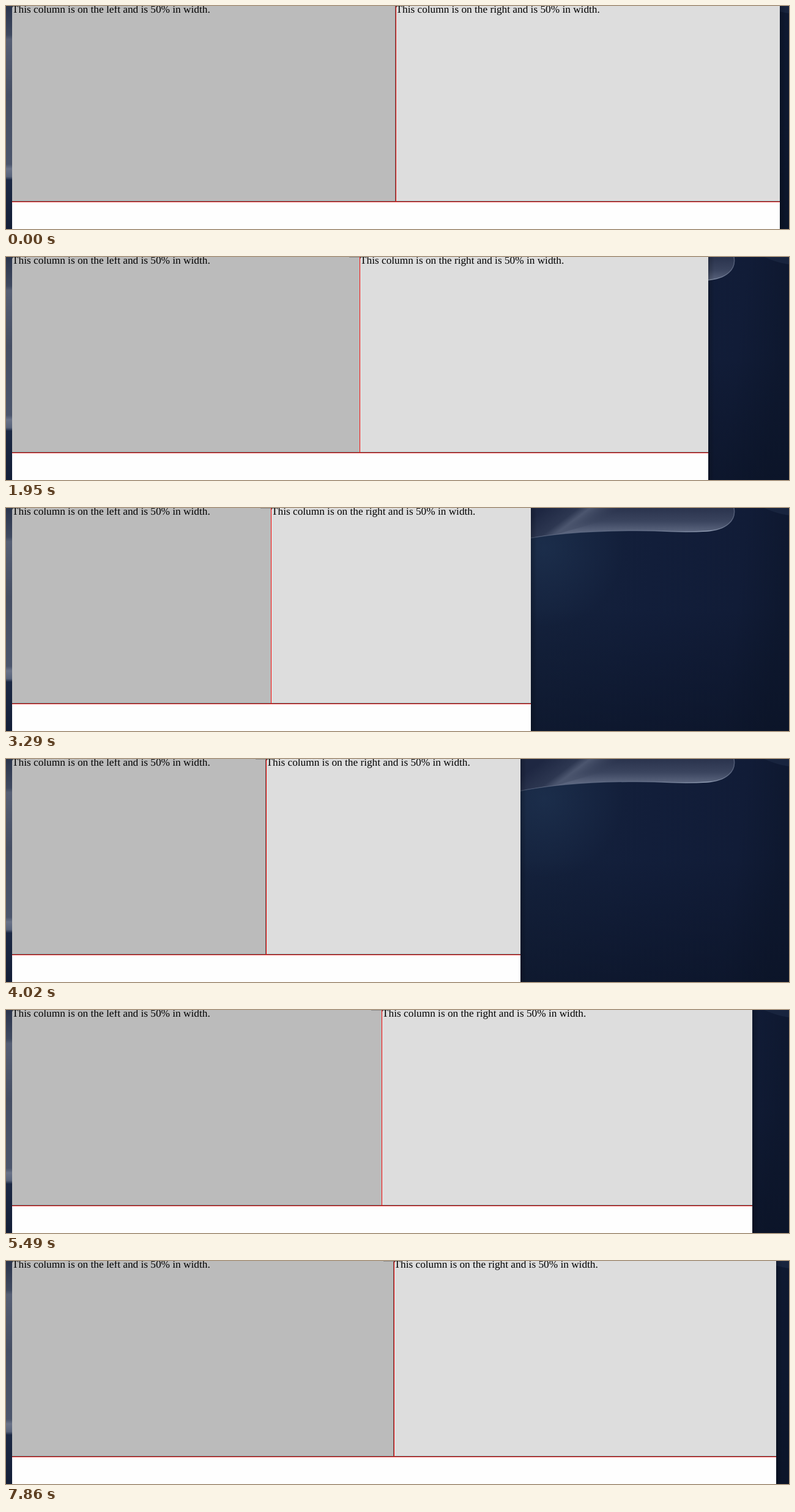
An HTML page that plays this animation: 1280x366 px, repeating every 8.26 s.

```html
<!DOCTYPE html>
<html lang="en">
<head>
<meta charset="utf-8">
<title>Two columns in a resized window</title>
<style>
  html, body { margin: 0; width: 100%; height: 100%; overflow: hidden; background: #0e1930; }
  svg { display: block; width: 1280px; height: 366px; }
  text { font: 17.27px "Liberation Serif", "Times New Roman", serif; text-rendering: geometricPrecision; }
  .line { fill: #f5100f; }
  .seam { fill: #5a5c5c; }
</style>
</head>
<body>
<svg viewBox="0 0 1280 366">
  <defs>
    <linearGradient id="night" x1="800" y1="0" x2="1280" y2="60" gradientUnits="userSpaceOnUse">
      <stop offset="0" stop-color="#15233d"/>
      <stop offset=".55" stop-color="#121e3a"/>
      <stop offset=".85" stop-color="#111c37"/>
      <stop offset="1" stop-color="#0e182f"/>
    </linearGradient>
    <linearGradient id="dusk" x2="0" y2="1">
      <stop offset=".45" stop-color="#0a1224" stop-opacity="0"/>
      <stop offset="1" stop-color="#0a1224" stop-opacity=".55"/>
    </linearGradient>
    <radialGradient id="glow" cx="880" cy="65" r="130" gradientUnits="userSpaceOnUse">
      <stop offset="0" stop-color="#263f60" stop-opacity=".4"/>
      <stop offset="1" stop-color="#263f60" stop-opacity="0"/>
    </radialGradient>
    <linearGradient id="dune" x2="0" y2="1">
      <stop offset="0" stop-color="#2a334d"/>
      <stop offset=".35" stop-color="#3a445e"/>
      <stop offset=".62" stop-color="#5a647d"/>
      <stop offset="1" stop-color="#4c5670"/>
    </linearGradient>
    <linearGradient id="slope" x1="880" y1="0" x2="925" y2="60" gradientUnits="userSpaceOnUse">
      <stop offset="0" stop-color="#1e2742"/>
      <stop offset=".45" stop-color="#2d3751"/>
      <stop offset=".6" stop-color="#4c566f"/>
      <stop offset="1" stop-color="#364059" stop-opacity="0"/>
    </linearGradient>
    <linearGradient id="ridge" x1="800" x2="1195" y1="0" y2="0" gradientUnits="userSpaceOnUse">
      <stop offset="0" stop-color="#7e8aa3" stop-opacity=".2"/>
      <stop offset=".6" stop-color="#7e8aa3" stop-opacity=".45"/>
      <stop offset=".88" stop-color="#929eb4"/>
      <stop offset="1" stop-color="#4c5670"/>
    </linearGradient>
    <linearGradient id="edge" x2="0" y2="1">
      <stop offset="0" stop-color="#2b354c"/>
      <stop offset=".13" stop-color="#3f495f"/>
      <stop offset=".15" stop-color="#565f74"/>
      <stop offset=".4" stop-color="#454e63"/>
      <stop offset=".71" stop-color="#4b556b"/>
      <stop offset=".73" stop-color="#6a7388"/>
      <stop offset=".765" stop-color="#58637a"/>
      <stop offset=".78" stop-color="#1b2843"/>
      <stop offset="1" stop-color="#131e37"/>
    </linearGradient>
    <linearGradient id="shade">
      <stop offset="0" stop-color="#000" stop-opacity=".22"/>
      <stop offset="1" stop-color="#000" stop-opacity="0"/>
    </linearGradient>
  </defs>

  <rect width="1280" height="366" fill="url(#night)"/>
  <rect width="1280" height="366" fill="url(#glow)"/>
  <rect width="1280" height="366" fill="url(#dusk)"/>
  <path d="M1240 0Q1258 9 1280 12V0Z" fill="#18243e"/>
  <path d="M800 62Q850 48 915 42T1060 37.500Q1110 40 1145 38C1178 36 1194 20 1190 0H800Z" fill="url(#dune)"/>
  <path d="M800 62Q850 48 900 43L1050 0H800Z" fill="url(#slope)"/>
  <path d="M800 62Q850 48 915 42T1060 37.500Q1110 40 1145 38C1178 36 1194 20 1190 0" fill="none" stroke="url(#ridge)" stroke-width="1.500"/>

  <rect width="10" height="366" fill="url(#edge)"/>
  <rect id="shadow" width="10" height="366" fill="url(#shade)"/>
  <rect id="page" x="10" height="366" fill="#fefefe"/>
  <rect id="left" x="10" height="321" fill="#bbb"/>
  <rect id="right" height="321" fill="#ddd"/>
  <rect id="bottomSeam" class="seam" x="10" y="320" height="1"/>
  <rect id="bottom" class="line" x="10" y="321" height="1"/>
  <rect id="dividerSeam" class="seam" width="1" height="321"/>
  <rect id="divider" class="line" width="1" height="321"/>
  <rect id="tab" width="17" height="1" fill="#8c8c8c"/>
  <text x="10" y="10.8">This column is on the left and is 50% in width.</text>
  <text id="label" y="10.8">This column is on the right and is 50% in width.</text>
</svg>
<script>
  const LOOP = 8260, LEFT = 10, TICK = 10;
  // Each run: start, end, then the window's right edge at evenly spaced steps.
  const runs = [
    [0, 0, 1265],
    [1500, 1500, 1236],
    [1800, 2250, 1193, 1148, 1102, 1055],
    [2550, 3590, 995, 951, 918, 893, 873, 858, 846, 838],
    [3730, 4320, 825, 814, 841, 892, 948],
    [4610, 4760, 1031, 1069],
    [5060, 6080, 1130, 1167, 1197, 1220, 1233, 1241, 1246, 1249],
    [6230, 6670, 1251, 1254, 1256, 1258],
    [7120, 7860, 1260, 1262, 1264, 1265, 1262, 1259]
  ];
  const wholeTick = time => Math.floor(time / TICK) * TICK;
  const steps = runs.flatMap(([start, end, ...edges]) =>
    edges.map((edge, i) => ({
      at: wholeTick(start + (end - start) * i / Math.max(1, edges.length - 1)),
      edge
    })));

  const el = id => document.getElementById(id);
  const set = (id, attrs) => {
    for (const name in attrs) el(id).setAttribute(name, attrs[name]);
  };

  function draw(time) {
    const { at, edge } = steps.findLast(step => step.at <= time + 0.5);
    const middle = (LEFT + edge) / 2, line = Math.ceil(middle) - 1;
    const width = edge - LEFT;
    set("page", { width });
    set("left", { width: line - LEFT });
    set("right", { x: line, width: edge - line });
    set("bottomSeam", { width });
    set("bottom", { width });
    // A divider between two whole pixels shows a dark seam on its left.
    set("dividerSeam", { x: line - 1, opacity: middle % 1 ? 1 : 0 });
    set("divider", { x: line });
    set("tab", { x: line - 17, opacity: at ? 1 : 0 });
    set("label", { x: middle });
    set("shadow", { x: edge });
  }

  let origin;
  function tick(now) {
    origin ??= now;
    draw((now - origin) % LOOP);
    requestAnimationFrame(tick);
  }
  draw(0);
  requestAnimationFrame(tick);
</script>
</body>
</html>
```
